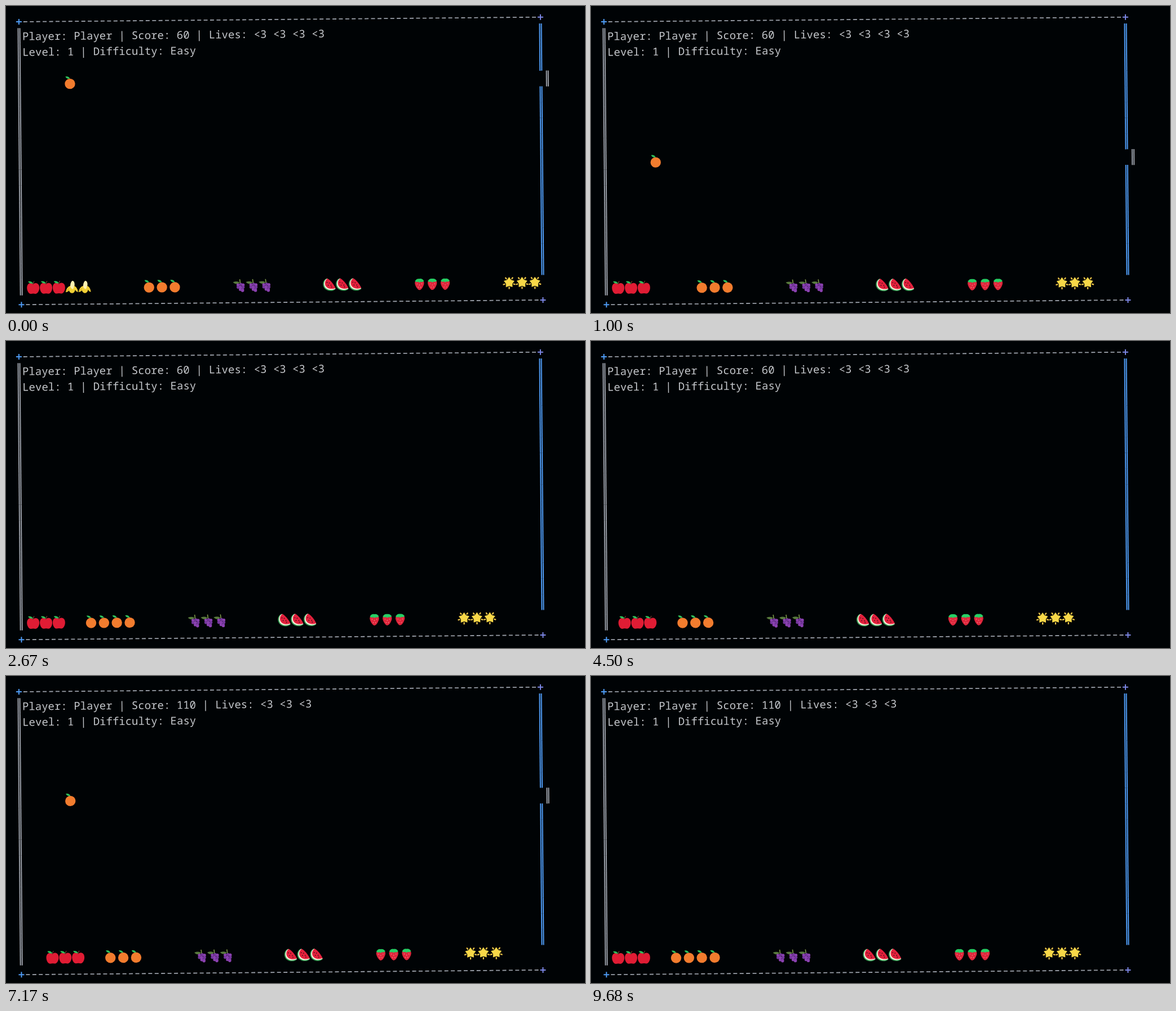
Write an HTML page with a canvas that moves like this. It is 1027 by 545 pixels and loops after 9.77 s.

```html
<!DOCTYPE html>
<html lang="en">
<head>
<meta charset="utf-8">
<title>Fruit catcher</title>
<style>
  html, body { margin: 0; width: 100%; height: 100%; overflow: hidden; background: #000305; }
  canvas { display: block; }
</style>
</head>
<body>
<canvas id="stage" width="1027" height="545"></canvas>
<script>
const ctx = document.getElementById('stage').getContext('2d');
const LOOP = 9770, CELL = 11.42, ROW = 27.9, TILT = 0.009, COLS = 82, FLOOR = 17, DROP_COL = 7;
const GRAY = '#9a9fa8', BLUE = '#4f9cf5';

function fill(color, path) {
  ctx.fillStyle = color;
  ctx.fill(new Path2D(path));
}
function stroke(color, width, path) {
  ctx.strokeStyle = color;
  ctx.lineWidth = width;
  ctx.stroke(new Path2D(path));
}
function disc(color, x, y, r) {
  ctx.fillStyle = color;
  ctx.beginPath();
  ctx.arc(x, y, r, 0, 7);
  ctx.fill();
}

// Each glyph is drawn around (0, 0), about 23 px wide.
const glyphs = {
  apple() {
    fill('#e01c34', 'M0-6C4-9 11-8 11 1C11 7 7 12 4 11.5Q0 10.5-4 11.5C-7 12-11 7-11 1C-11-8-4-9 0-6Z');
    stroke('#6b3a2a', 1.4, 'M0-5Q0-9 2-11');
    fill('#2fc05c', 'M0-7Q-3-12-9-10.5Q-6-5.5 0-7Z');
  },
  banana() {
    fill('#fff0b0', 'M-3 4Q-3-9 1-11Q5-11 5-4L4 5Z');
    fill('#f2d036', 'M-3-2Q-9 0-11 9Q-7 9-5 6Q-4 10 0 11Q5 11 6 5Q8 9 11 9Q10 0 4-2Q4 2 2 4Q-2 3-3-2Z');
    stroke('#c9a22a', 1, 'M-9 7L-5 3');
  },
  orange() {
    disc('#f27c2e', 0, 2, 9.2);
    fill('#2fc05c', 'M0-7Q-2-12-8-11Q-6-6 0-7Z');
  },
  grapes() {
    stroke('#7d9a4a', 1.6, 'M1-11L2-4');
    fill('#587a3d', 'M1-5Q-3-9-11-6Q-8-2-2-3Z');
    const berries = [[-2, -1], [3, -2], [7, -1], [-2, 3], [2, 3], [7, 3], [2, 7], [6, 7], [6, 9]];
    berries.forEach(([x, y], i) => disc(i % 2 ? '#74379c' : '#8a41b0', x, y, 2.7));
  },
  melon() {
    fill('#2f9a50', 'M-5-11C-13-7-13 3-7 8C-2 12 7 12 11 8Z');
    fill('#f3ead8', 'M-4-11C-11-7-11 2-6 6.500C-1 10.500 7 10 11 7Z');
    fill('#e3203c', 'M-3-11C-9-7-9 1-4 5C0 8 7 8 11 6Q5-6-3-11Z');
    for (const [x, y] of [[-4, -4], [0, -3], [-2, 1], [3, 1], [4, 4]]) disc('#3a1418', x, y, 0.9);
  },
  strawberry() {
    fill('#e0263c', 'M0-6C6-8 9-4 8 0C7 5 3 11 0 11C-3 11-7 5-8 0C-9-4-6-8 0-6Z');
    for (const [x, y] of [[-4, 0], [0, 2], [4, 0], [-2, 6], [2, 6]]) disc('#f7a39b', x, y, 0.7);
    fill('#25d065', 'M-8-5Q-5-10 0-9Q5-10 8-5Q5-3 4-3Q2-5 0-2Q-2-5-4-3Q-6-3-8-5Z');
  },
  star() {
    ctx.save();
    ctx.translate(-0.8, -0.8);
    disc('#f8d848', 0, 0, 5);
    for (let i = 0; i < 5; i++) {
      fill('#f8d848', 'M0 3L-4.500-3.500L0-10L4.500-3.500Z');
      stroke('#f0c84a', 2.2, 'M0 7.500L0 11.500');
      ctx.rotate(Math.PI * 0.4);
    }
    ctx.restore();
  }
};
const baskets = ['orange', 'grapes', 'melon', 'strawberry', 'star'];

const steps = (t, start, gap, max) =>
  Math.max(0, Math.min(max, Math.floor((t - start) / gap) + 1));

function dropRow(t) {
  if (t < 3000) return Math.min(FLOOR, 4 + Math.floor(t / 200));
  return t < 6340 ? -1 : Math.min(FLOOR, 3 + Math.floor((t - 6340) / 200));
}

// One array entry per character; a fruit prints two columns wide.
function buildRow(row, t) {
  const cells = Array(COLS).fill('');
  cells[0] = cells[COLS - 1] = 'wall';
  const drop = dropRow(t) === row;
  if (row === FLOOR) {
    const pos = 14 - steps(t, 320, 320, 7) + steps(t, 4300, 480, 4) - steps(t, 6980, 720, 4);
    const apple = t < 2600 ? 1 : pos - 6;
    const put = (name, col) => cells.fill(name, col, col + 3);
    put('banana', Math.max(apple, pos - 11));
    put('apple', apple);
    baskets.forEach((name, i) => put(name, pos + 11 * i));
    if (drop) cells.splice(DROP_COL, 0, 'orange');
  } else if (drop) {
    cells[DROP_COL] = 'orange';
  }
  return cells;
}

function wall(col, y) {
  const x = (col + 0.5) * CELL;
  ctx.fillStyle = col === COLS - 1 ? BLUE : GRAY;
  for (const dx of [-2.6, 0.5]) ctx.fillRect(x + dx, y - ROW / 2, 2, ROW + 0.2);
}

function drawRow(row, t) {
  const y = row * ROW - 2.7;
  let col = 0;
  for (const cell of buildRow(row, t)) {
    if (cell === 'wall') wall(col, y);
    else if (cell) {
      ctx.save();
      ctx.translate((col + 1) * CELL + 3.9, y);
      glyphs[cell]();
      ctx.restore();
      col++;
    }
    col++;
  }
}

function border(row) {
  const y = row * ROW;
  ctx.fillStyle = GRAY;
  for (let c = 1; c < COLS - 1; c++) ctx.fillRect((c + 0.5) * CELL - 3.5, y - 0.9, 7, 1.8);
  for (const c of [0, COLS - 1]) {
    const x = (c + 0.5) * CELL;
    stroke(c ? '#7d88e6' : BLUE, 2, `M${x - 5} ${y}h10M${x} ${y - 5}v10`);
  }
}

function draw(t) {
  ctx.setTransform(1, 0, 0, 1, 0, 0);
  ctx.fillStyle = '#000305';
  ctx.fillRect(0, 0, 1027, 545);
  ctx.setTransform(1, -TILT, TILT, 1, 17.2, 28.1);
  border(0);
  border(18);
  for (let row = 1; row <= FLOOR; row++) drawRow(row, t);

  const [score, lives] = t < 6340 ? [60, 4] : [110, 3];
  ctx.font = '500 19.03px "Noto Sans Mono", monospace';
  ctx.fillStyle = '#c6c9cd';
  ctx.fillText(`Player: Player | Score: ${score} | Lives: ${'<3 '.repeat(lives)}`, CELL, ROW + 4.7);
  ctx.fillText('Level: 1 | Difficulty: Easy', CELL, 2 * ROW + 4.7);
}

const begin = performance.now();
function tick() {
  draw((performance.now() - begin) % LOOP);
  requestAnimationFrame(tick);
}
tick();
</script>
</body>
</html>
```
